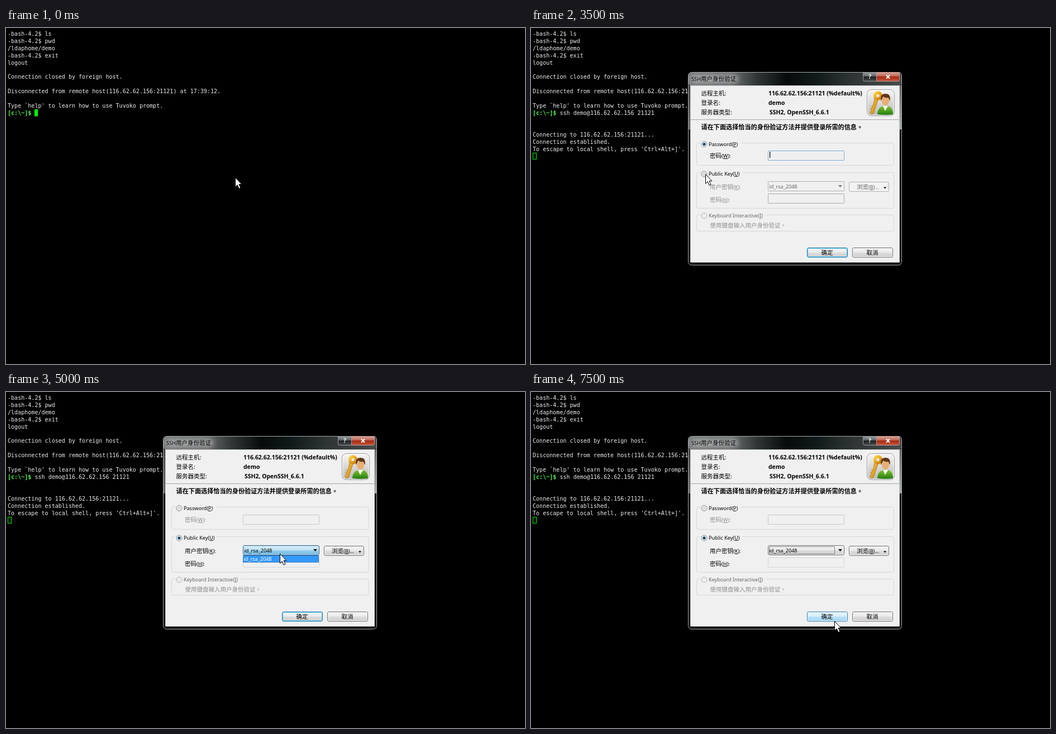
Recreate the animation shown at these times as an HTML page. Size 929 by 603 pixels, loop 8 s.

```html
<!DOCTYPE html>
<html lang="zh-CN">
<head>
<meta charset="utf-8">
<title>SSH login</title>
<style>
html, body { margin: 0; width: 100%; height: 100%; overflow: hidden; background: #000; }
svg { display: block; width: 929px; height: 603px; }
text { white-space: pre; font: 9.1px "Noto Sans", "Noto Sans CJK SC", sans-serif; fill: #000; }
.term { font: 10.06px "DejaVu Sans Mono", monospace; fill: #eee; }
.prompt { font-weight: bold; fill: #4cf84c; }
.cjk { font: 10.5px "Noto Sans CJK SC", "Noto Sans CJK", sans-serif; }
.lead { font: bold 11.15px "Noto Sans CJK SC", "Noto Sans CJK", sans-serif; }
.stop { font-family: "Noto Sans CJK TC", "Noto Sans CJK", sans-serif; }
.bold { font-weight: bold; font-size: 10.45px; }
.off { fill: #8e8e8e; }
.mid { fill: #666; }
.white { fill: #fff; }
.key { text-decoration: underline; }
.lat { font: 9.3px "Noto Sans", sans-serif; }
</style>
</head>
<body>
<svg viewBox="0 0 929 603">
  <defs>
    <linearGradient id="glass">
      <stop offset="0" stop-color="#777a7b"/><stop offset=".2" stop-color="#686c6d"/>
      <stop offset=".32" stop-color="#303636"/><stop offset=".46" stop-color="#070b0b"/>
      <stop offset=".6" stop-color="#111a1a"/><stop offset=".75" stop-color="#2c3232"/>
      <stop offset="1" stop-color="#4a4d4e"/>
    </linearGradient>
    <linearGradient id="side" x2="0" y2="1">
      <stop offset="0" stop-color="#666"/><stop offset="1" stop-color="#a8acad"/>
    </linearGradient>
    <linearGradient id="grey" x2="0" y2="1">
      <stop offset="0" stop-color="#f2f2f2"/><stop offset=".5" stop-color="#ebebeb"/>
      <stop offset=".5" stop-color="#dddddd"/><stop offset="1" stop-color="#cfcfcf"/>
    </linearGradient>
    <linearGradient id="pale" x2="0" y2="1">
      <stop offset="0" stop-color="#eef5f9"/><stop offset=".5" stop-color="#e2eff6"/>
      <stop offset=".5" stop-color="#d0e4ef"/><stop offset="1" stop-color="#c2dcea"/>
    </linearGradient>
    <linearGradient id="blue" x2="0" y2="1">
      <stop offset="0" stop-color="#e8f5fc"/><stop offset=".5" stop-color="#d6eefb"/>
      <stop offset=".5" stop-color="#bbe2f7"/><stop offset="1" stop-color="#a2d5f0"/>
    </linearGradient>
    <linearGradient id="press" x2="0" y2="1">
      <stop offset="0" stop-color="#d8edf8"/><stop offset=".5" stop-color="#c0e2f4"/>
      <stop offset=".5" stop-color="#98d1ef"/><stop offset="1" stop-color="#6cb5dc"/>
    </linearGradient>
    <linearGradient id="red" x2="0" y2="1">
      <stop offset="0" stop-color="#d9a49a"/><stop offset=".45" stop-color="#bf6350"/>
      <stop offset=".5" stop-color="#a52a15"/><stop offset="1" stop-color="#c4563a"/>
    </linearGradient>
    <linearGradient id="help" x2="0" y2="1">
      <stop offset="0" stop-color="#9a9fa1"/><stop offset=".45" stop-color="#5d6264"/>
      <stop offset=".5" stop-color="#1e2425"/><stop offset="1" stop-color="#474c4e"/>
    </linearGradient>
    <linearGradient id="tile" x2="0" y2="1">
      <stop offset="0" stop-color="#f6f6f6"/><stop offset="1" stop-color="#b9b9b9"/>
    </linearGradient>
    <linearGradient id="gold" x2="1" y2="1">
      <stop offset="0" stop-color="#ffd23c"/><stop offset="1" stop-color="#cf7c06"/>
    </linearGradient>
    <linearGradient id="shirt" x2="0" y2="1">
      <stop offset="0" stop-color="#7cc42c"/><stop offset="1" stop-color="#257c12"/>
    </linearGradient>
    <filter id="blur" x="-20%" y="-100%" width="140%" height="300%"><feGaussianBlur stdDeviation="4"/></filter>
  </defs>
  <g id="scene"></g>
  <path id="pointer" d="M.5.5V17.3L4.3 13.7 7 20.3 9.9 19.1 7.1 12.6H11.9Z" fill="#fff" stroke="#000"/>
</svg>
<script>
const LOOP = 8000;
const LEFT = 3, TOP = 13.9, CELL = 6.055, LINE = 12.93;

// time, pointer x and y, then what differs from the plain dialog
const steps = [
  [0, 410, 268, { typed: '' }],
  [1000, 410, 268, { typed: 'ssh demo@116.62.62.156 21121' }],
  [2500, 410, 268, { mode: 'pass', caret: 1 }],
  [3000, 410, 268, { mode: 'pass' }],
  [3500, 312, 262, { mode: 'pass', caret: 1 }],
  [4000, 474, 307, { mode: 'key', focus: 1, caret: 1 }],
  [4500, 530, 283, { mode: 'key', focus: 1, combo: 'blue' }],
  [5000, 490, 290, { mode: 'key', combo: 'press', list: 1 }],
  [5500, 492, 297, { mode: 'key', dots: 1 }],
  [6000, 552, 415, { mode: 'key', dots: 1 }],
  [6500, 544, 416, { mode: 'key', dots: 1, ok: 'pale' }],
  [7000, 533, 401, { mode: 'key', dots: 1, ok: 'blue' }],
  [7500, 543, 411, { mode: 'key', dots: 1, ok: 'blue' }]
];

const history = ['-bash-4.2$ ls', '-bash-4.2$ pwd', '/ldaphome/demo', '-bash-4.2$ exit', 'logout', '',
  'Connection closed by foreign host.', '',
  'Disconnected from remote host(116.62.62.156:21121) at 17:39:12.', '',
  "Type `help' to learn how to use Tuvoko prompt."];
const connecting = ['Connecting to 116.62.62.156:21121...', 'Connection established.',
  "To escape to local shell, press 'Ctrl+Alt+]'."];

const text = (x, y, s, cls = '', more = '') => `<text x="${x}" y="${y}" class="${cls}" ${more}>${s}</text>`;
const rect = (x, y, w, h, fill, stroke = 'none', r = 0, more = '') =>
  `<rect x="${x}" y="${y}" width="${w}" height="${h}" rx="${r}" fill="${fill}" stroke="${stroke}" ${more}/>`;
const path = (d, fill, more = '') => `<path d="${d}" fill="${fill}" ${more}/>`;
const cell = (col, row, s, cls = '') => text(LEFT + col * CELL, TOP + row * LINE, s, 'term ' + cls);
const lines = (list, row) => list.map((s, i) => cell(0, row + i, s)).join('');
const key = c => `(<tspan class="key">${c}</tspan>)`;
const label = (y, s, c, cls) => text(320, y, `${s}<tspan class="lat">${key(c)}:</tspan>`, 'cjk ' + cls);
const arrow = (x, y, fill) => path(`M${x - 3.5} ${y}h7l-3.5 4z`, fill);
const stop = '<tspan class="stop" lang="zh-TW">。</tspan>';

function terminal(typed, done) {
  const end = LEFT + (8 + typed.length) * CELL;
  return lines(history, 0) + cell(0, 11, '[c:\\~]$', 'prompt') + cell(8, 11, typed) +
    (done ? lines(connecting, 14) + rect(3.5, 224.5, 6, 11, 'none', '#0f0')
          : rect(Math.round(end), 146, 6, 12.5, '#0f0'));
}

function group(y, h, gap) {
  return path(`M303 ${y}H299.5q-3 0-3 3V${y + h - 3}q0 3 3 3H646.5q3 0 3-3V${y + 3}q0-3-3-3H${gap}`,
    'none', 'stroke="#d2d6dc"');
}

function radio(y, on, enabled = true) {
  return `<circle cx="310" cy="${y}" r="5" fill="${enabled ? '#f4f4f4' : '#ececec'}" stroke="${enabled ? '#868686' : '#b5b5b5'}"/>` +
    (enabled ? `<circle cx="310" cy="${y}" r="3.3" fill="${on ? '#b8d8e6' : '#dcdcdc'}"/>` : '') +
    (on ? `<circle cx="310" cy="${y}" r="2.5" fill="#17466c"/>` : '');
}

function field(y, focus, caret, border) {
  return rect(424.5, y + .5, 136, 17, '#f0f0f0', focus ? '#7fa9cf' : border, 1) +
    (caret ? rect(427, y + 2, 1.2, 11, '#000') : '');
}

function button(x, y, w, h, fill, ring, edge = '#707070') {
  return rect(x + .5, y + .5, w - 1, h - 1, `url(#${fill})`, edge, 2.5) +
    rect(x + 1.5, y + 1.5, w - 3, h - 3, 'none', ring, 1.5);
}

function badge() {
  return rect(601.5, 110.5, 49, 47, 'url(#tile)', '#999', 8) + rect(602.7, 111.7, 46.6, 44.6, 'none', '#fff', 7) +
    `<circle cx="621" cy="121.5" r="5.5" fill="none" stroke="url(#gold)" stroke-width="5.5"/>` +
    path('M615 126l6 3-8 24-4 2-2-4 3-3-2-3 3-2-1-3 3-2z', 'url(#gold)', 'stroke="#a86606" stroke-width=".7"') +
    path('M620 155q0-12 10-15h10q8 3 8 15-13 2-28 0z', 'url(#shirt)') +
    path('M630 140l4 9 5-9z', '#fff') +
    `<ellipse cx="634.5" cy="131" rx="6.5" ry="8.5" fill="#e8ae72"/>` +
    path('M626.5 131q-2-13 8-13 10 0 8 13l-3-6q-6 1-9-2z', '#5f3618');
}

function frame() {
  return rect(281.5, 79.5, 382, 346, '#080909', 'none', 6) +
    rect(282, 80, 381, 24, 'url(#glass)', 'none', 5) +
    rect(282, 103, 4, 79, 'url(#side)', 'none', 0, 'opacity=".6"') + rect(660, 103, 4, 79, 'url(#side)') +
    rect(281.5, 79.5, 382, 346, 'none', '#a9acad', 6) +
    rect(287, 85, 84, 13, '#d8d8d8', 'none', 5, 'filter="url(#blur)" opacity=".55"') +
    text(287, 95, '<tspan class="lat">SSH</tspan>用户身份验证', 'cjk') +
    path('M594.5 79.5h24v16h-21q-3 0-3-3z', 'url(#help)', 'stroke="#999"') +
    path('M618.5 79.5h41v13q0 3-3 3h-38z', 'url(#red)', 'stroke="#b99"') +
    text(606.5, 91, '?', 'bold white', 'text-anchor="middle"') +
    path('M636 84.5l6 6m0-6l-6 6', 'none', 'stroke="#fff" stroke-width="2"') +
    rect(285.5, 103.5, 374, 317, '#f0f0f0', '#c4c6c7') +
    rect(286, 164, 373, 1, '#a5a5a5');
}

function dialog(s) {
  const pass = s.mode === 'pass', pub = !pass;
  const dim = on => on ? '' : 'off';
  const ink = pub ? '#000' : '#777';
  let out = frame() + badge() +
    text(304.5, 121, '远程主机:', 'cjk') + text(425, 121, '116.62.62.156:21121 (%default%)', 'bold') +
    text(304.5, 138, '登录名:', 'cjk') + text(425, 138, 'demo', 'bold') +
    text(304.5, 155, '服务器类型:', 'cjk') + text(427, 154.5, 'SSH2, OpenSSH_6.6.1', 'bold') +
    text(304.5, 182, '请在下面选择恰当的身份验证方法并提供登录所需的信息' + stop, 'lead') +
    group(206.5, 40, 377) + group(259.5, 64, 378) + group(335.5, 29, 421) +
    radio(208.5, pass) + text(318, 212, 'Password' + key('P')) +
    label(233, '密码', 'W', dim(pass)) + field(220, pass, pass && s.caret, '#c6c8cc') +
    radio(262, pub) + text(318, 265, 'Public Key' + key('U')) +
    label(289, '用户密钥', 'K', dim(pub)) + label(311.5, '密码', 'H', dim(pub)) +
    field(297, s.focus, pub && s.caret, pass ? '#a6a8ad' : '#d3d5d9');

  out += pub
    ? button(424, 275, 137, 18, s.combo || 'grey', s.combo ? '#c4e5f5' : '#f6f6f6', s.combo ? '#2c628b' : '#707070') +
      button(569, 276, 72, 18, 'grey', '#f6f6f6')
    : rect(424.5, 275.5, 136, 17, '#f0f0f0', '#aeb0b4', 1) +
      rect(569.5, 276.5, 71, 17, '#f2f2f2', '#adb2b5', 2.5);
  out += text(426.5, 287.5, 'id_rsa_2048', pub ? '' : 'mid') + arrow(553.5, 282, ink);
  if (s.dots) out += rect(426.5, 277.5, 117, 13, 'none', '#222', 0, 'stroke-dasharray="1 1"');

  out += text(583, 289, `浏览<tspan class="lat">${key('B')}...</tspan>`, 'cjk ' + (pub ? '' : 'mid')) +
    path('M631 285.5h5l-2.5 3z', '#000') +
    radio(337, false, false) + text(318, 340, 'Keyboard Interactive' + key('I'), 'mid') +
    text(320.5, 358, '使用键盘输入用户身份验证' + stop, 'cjk off') +
    button(494, 394, 73, 18, s.ok || 'grey', s.ok === 'blue' ? '#dff3fd' : '#45c4ee', '#3c7fb1') +
    text(530, 407, '确定', 'cjk', 'text-anchor="middle"') +
    button(575, 394, 73, 18, 'grey', '#f6f6f6') +
    text(611, 407, '取消', 'cjk', 'text-anchor="middle"');

  if (s.list) out += rect(424.5, 293.5, 135, 12, '#3399ff', '#3c78b4') + text(425.5, 303, 'id_rsa_2048', 'white');
  return out;
}

const scene = document.getElementById('scene');
const pointer = document.getElementById('pointer');
let shown;

function tick() {
  const t = performance.now() % LOOP;
  const step = steps.findLast(s => s[0] <= t);
  if (step !== shown) {
    const [, x, y, s] = shown = step;
    scene.innerHTML = s.mode ? terminal(steps[1][3].typed, true) + dialog(s) : terminal(s.typed);
    pointer.setAttribute('transform', `translate(${x} ${y})`);
  }
  requestAnimationFrame(tick);
}
tick();
</script>
</body>
</html>
```
